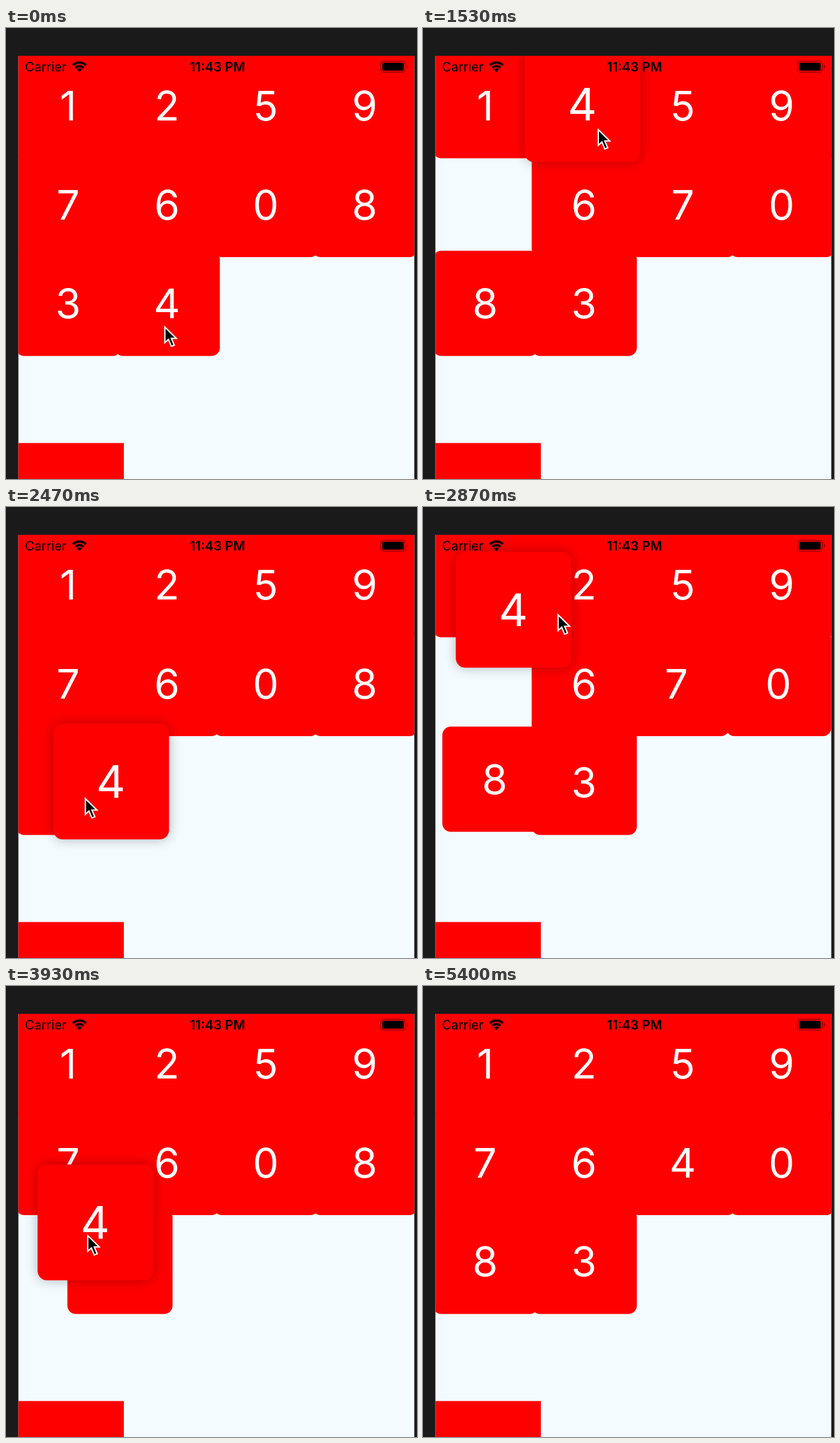
Write an HTML page that moves like this. It is 680x746 px and loops after 5990 ms.

```html
<!DOCTYPE html>
<html lang="en">
<head>
<meta charset="utf-8">
<title>Reordering tiles</title>
<style>
  html, body { margin: 0; width: 100%; height: 100%; overflow: hidden; background: #1a1a1a; }
  svg { display: block; width: 680px; height: 746px; font-family: Inter, Roboto, sans-serif; }
  .digit { font-size: 68px; fill: #fff; text-anchor: middle; }
  .status { font-size: 21px; }
  .clock { font-size: 21.4px; font-weight: 600; text-anchor: middle; }
</style>
</head>
<body>
<svg viewBox="0 0 680 746">
  <defs>
    <clipPath id="screen"><rect x="20.5" y="46" width="655" height="700"/></clipPath>
    <filter id="blur" x="-30%" y="-30%" width="160%" height="160%">
      <feGaussianBlur stdDeviation="9"/>
    </filter>
  </defs>
  <rect width="680" height="746" fill="#1a1a1a"/>
  <g clip-path="url(#screen)">
    <rect x="20" y="46" width="656" height="700" fill="#f3fbff"/>
    <rect x="20" y="686.5" width="175" height="60" fill="#f00"/>
    <g id="tiles"></g>
  </g>
  <g class="status">
    <text x="31.5" y="71.5">Carrier</text>
    <text class="clock" x="350" y="71.5">11:43 PM</text>
    <g fill="none" stroke="#000" stroke-width="3.8">
      <path d="M110.7 61.6A15.2 15.2 0 0 1 132.3 61.6"/>
      <path d="M114.9 66A9.2 9.2 0 0 1 128.1 66"/>
    </g>
    <path d="M117.4 68.6A5.4 5.4 0 0 1 125.6 68.6L121.5 73Z"/>
    <rect x="620" y="55" width="40.5" height="18" rx="4.5" fill="none" stroke="#000" stroke-opacity=".42" stroke-width="1.6"/>
    <rect x="622.6" y="57.6" width="35.3" height="12.8" rx="2"/>
    <path d="M663 60.5Q665.4 61.5 665.4 64T663 67.5Z" fill-opacity=".42"/>
  </g>
  <path id="cursor" d="M1 2.5V28.5L7 23L11.8 34.5L16.6 32.5L11.8 21.3H20Z" stroke="#fff" stroke-width="2.2"/>
</svg>
<script>
const LOOP = 5990, FRAME = 1000 / 15;
const PITCH = 163.5, SIZE = 174, SHIFT_MS = 280;
const LIFT = 470, DROP = 4900, EXIT = 5200, CURSOR_GONE = 5400;
const GRIP = [-5, 36.5], LEAD_MS = 90, EXIT_BY = [113, 4];
const HELD = "4", START_ORDER = "1259760834";
const NS = "http://www.w3.org/2000/svg";

const clamp = u => Math.max(0, Math.min(1, u));
const ease = u => (u = clamp(u), u * u * (3 - 2 * u));
const mix = (a, b, u) => a + (b - a) * u;
const slotPos = i => [103.3 + (i % 4) * PITCH, 128.6 + Math.floor(i / 4) * PITCH];

// Two clockwise laps of the held tile, as time, x, y.
const dragPath = [
  [LIFT, ...slotPos(9)], [870, 210, 433], [1070, 120, 360], [1250, 150, 150],
  [1530, 264, 126], [1850, 350, 170], [2050, 460, 330], [2250, 290, 450],
  [2470, 174, 454], [2670, 110, 400], [2870, 150, 170], [3130, 505, 250],
  [3330, 481.5, 311], [3530, 440, 350], [3730, 195, 450], [3930, 148, 391],
  [4130, 155, 375], [4400, 300, 310], [DROP, ...slotPos(6)]
];

// Slots the held tile hops to; each hop swaps it with the tile there.
const hops = [
  [950, "8"], [1100, "764"], [1600, "3"], [1850, "46"], [2060, "7"], [2190, "89"],
  [2540, "8"], [2620, "764"], [2880, "3"], [3158, "46"], [3264, "7"], [3500, "89"],
  [3786, "8"], [4180, "76"]
];

const order = [...START_ORDER];
const moves = Object.fromEntries(order.map((digit, slot) => [digit, [[-LOOP, slot]]]));
for (const [time, slots] of hops) {
  for (const slot of slots) {
    const from = order.indexOf(HELD), digit = order[slot];
    moves[digit].push([time, from]);
    order[from] = digit;
    order[slot] = HELD;
  }
}

function make(tag, attrs, parent) {
  const el = document.createElementNS(NS, tag);
  for (const key in attrs) el.setAttribute(key, attrs[key]);
  return parent.appendChild(el);
}

// Smooth curve through timed points, at rest at both ends.
function along(path, t) {
  const last = path.length - 1;
  if (t <= path[0][0]) return path[0].slice(1);
  if (t >= path[last][0]) return path[last].slice(1);
  const i = path.findIndex(p => p[0] > t) - 1;
  const a = path[i], b = path[i + 1], span = b[0] - a[0];
  const u = (t - a[0]) / span;
  const slope = (j, k) => j === 0 || j === last ? 0 :
    (path[j + 1][k] - path[j - 1][k]) / (path[j + 1][0] - path[j - 1][0]);
  return [1, 2].map(k =>
    mix(a[k], b[k], ease(u)) +
    span * u * (1 - u) * ((1 - u) * slope(i, k) - u * slope(i + 1, k)));
}

function restingPos(digit, t) {
  let pos = slotPos(moves[digit][0][1]);
  for (const [start, slot] of moves[digit]) {
    const goal = slotPos(slot), u = ease((t - start) / SHIFT_MS);
    pos = pos.map((v, k) => mix(v, goal[k], u));
  }
  return pos;
}

// The cursor runs ahead of the tile in proportion to its speed.
function cursorPos(t) {
  const tile = along(dragPath, t);
  const before = along(dragPath, t - 5), after = along(dragPath, t + 5);
  const exit = ease((t - EXIT) / 130);
  return tile.map((v, k) =>
    v + GRIP[k] + (after[k] - before[k]) / 10 * LEAD_MS + EXIT_BY[k] * exit);
}

const box = { x: -SIZE / 2, y: -SIZE / 2, width: SIZE, height: SIZE, rx: 14 };
const layer = document.getElementById("tiles");
const cursor = document.getElementById("cursor");
let shadow;
const tiles = [..."1256083974"].map(digit => {
  const g = make("g", {}, layer);
  if (digit === HELD) shadow = make("rect", { ...box, filter: "url(#blur)" }, g);
  make("rect", { ...box, fill: "#f00" }, g);
  make("text", { class: "digit", x: -0.5, y: 24.5 }, g).textContent = digit;
  return { digit, g };
});

function draw(t) {
  const lift = ease((t - LIFT) / 200) * (1 - ease((t - DROP) / 200));
  for (const { digit, g } of tiles) {
    const held = digit === HELD;
    const [x, y] = held ? along(dragPath, t) : restingPos(digit, t);
    const scale = held ? 1 + 0.1 * lift : 1;
    g.setAttribute("transform", `translate(${x} ${y}) scale(${scale})`);
  }
  shadow.setAttribute("opacity", 0.28 * lift);
  const [x, y] = cursorPos(t);
  cursor.setAttribute("transform", `translate(${x} ${y})`);
  cursor.setAttribute("visibility", t < CURSOR_GONE ? "visible" : "hidden");
}

// The picture advances 15 times per second, on a 10 ms clock.
function tick() {
  const t = performance.now() % LOOP;
  const step = Math.floor((t + 4) / FRAME);
  draw(Math.round(step * FRAME / 10) * 10);
  requestAnimationFrame(tick);
}
tick();
</script>
</body>
</html>
```
